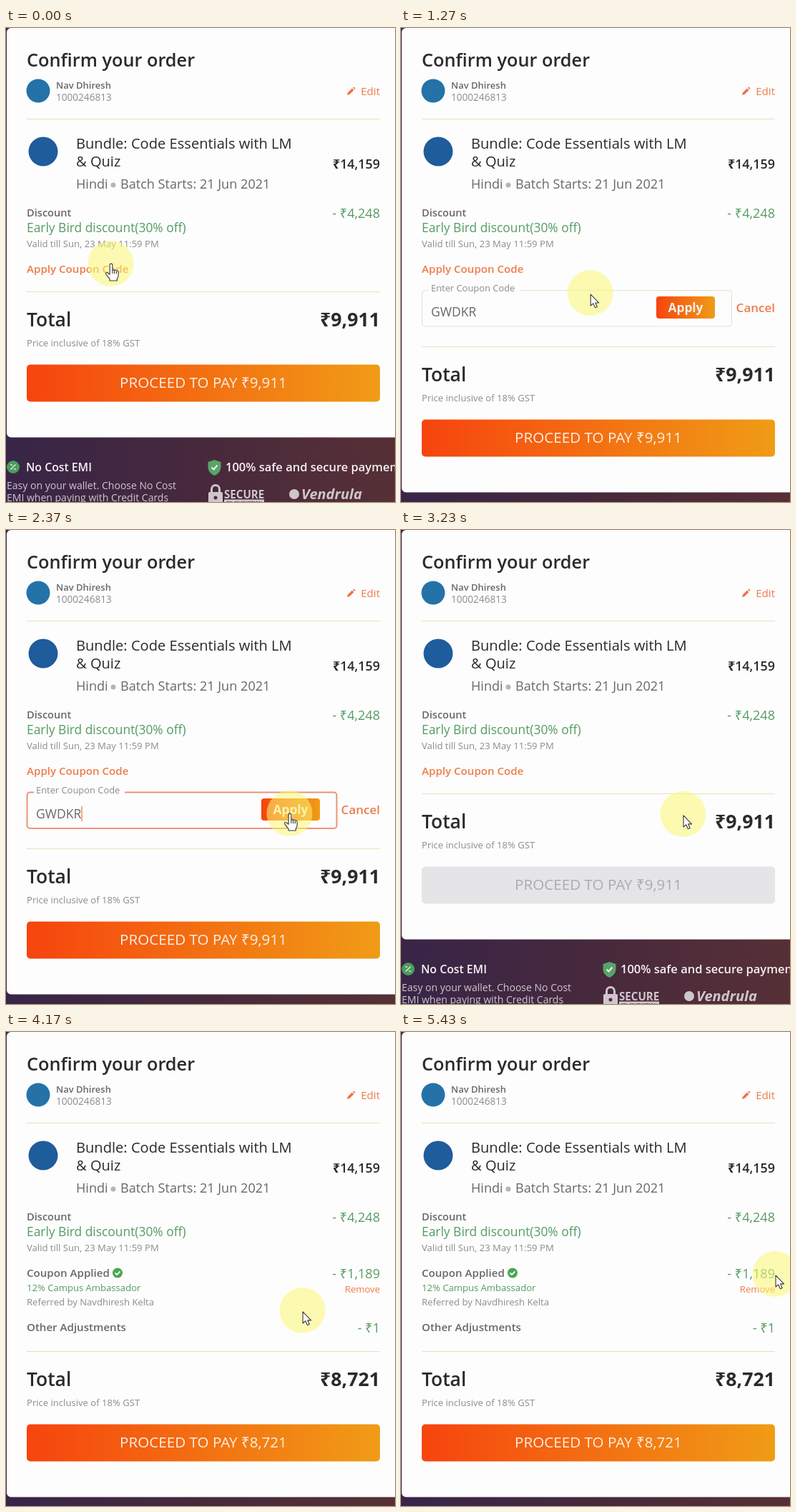
An HTML page that plays this animation: 544x664 px, repeating every 5.46 s.

```html
<!DOCTYPE html>
<html lang="en">
<head>
<meta charset="utf-8">
<title>Order checkout</title>
<style>
  html, body { margin: 0; width: 100%; height: 100%; overflow: hidden; background: #442a3e; }
  svg { display: block; width: 544px; height: 664px; font-family: "Open Sans", "Noto Sans", sans-serif; }
  text { white-space: pre; }
  .semi { font-weight: 600; }
  .bold { font-weight: 700; }
  .end { text-anchor: end; }
  .mid { text-anchor: middle; }
  .ink { fill: #2a2a2e; }
  .soft { fill: #68686a; }
  .pale { fill: #8c8c8c; }
  .green { fill: #559c64; }
  .orange { fill: #ee7c4c; }
  .cream { fill: #f6f0f2; }
  .beige { fill: #cfc6cc; }
  .s13 { font-size: 13.1px; }
  .s15 { font-size: 15.100px; }
  .s18 { font-size: 18.1px; }
  .rule { stroke: #e4e3bc; }
</style>
</head>
<body>
<svg viewBox="0 0 544 664">
  <defs>
    <linearGradient id="fire"><stop stop-color="#f6440e"/><stop offset="1" stop-color="#f09c16"/></linearGradient>
    <linearGradient id="dusk">
      <stop stop-color="#382548"/><stop offset=".5" stop-color="#47293c"/><stop offset="1" stop-color="#573036"/>
    </linearGradient>
  </defs>

  <rect width="544" height="664" fill="url(#dusk)"/>
  <rect id="card" x="1" y="0" width="560" height="573" rx="6" fill="#fdfdfd"/>

  <!-- order details -->
  <text x="29" y="54" font-size="25.300" class="semi ink">Confirm your order</text>
  <circle cx="45" cy="88" r="16.5" fill="#2472a8"/>
  <text x="70" y="85" font-size="13" class="semi soft">Nav Dhiresh</text>
  <text x="70" y="102" font-size="13.6" class="pale">1000246813</text>
  <path d="M477 94l1-3.500 6-6 2.500 2.500-6 6zM485 83.500l1.500-1 2 2-1 1.500z" fill="#f07048"/>
  <text x="523" y="94" class="end orange s15">Edit</text>
  <path d="M29 127.500H523" class="rule"/>
  <circle cx="52" cy="173" r="20.500" fill="#1f5c9c"/>
  <text x="98" y="169" font-size="20.100" class="ink">Bundle: Code Essentials with LM</text>
  <text x="98" y="194" font-size="20.100" class="ink">&amp; Quiz</text>
  <text x="98" y="225" class="soft s18">Hindi</text>
  <circle cx="150" cy="220" r="3.500" fill="#b6b6b0"/>
  <text x="160" y="225" class="soft s18">Batch Starts: 21 Jun 2021</text>
  <text x="523" y="197" font-size="17.900" class="semi end ink">₹14,159</text>
  <text x="29" y="264" font-size="14.600" class="semi soft">Discount</text>
  <text x="29" y="286" font-size="17.400" class="green">Early Bird discount(30% off)</text>
  <text x="29" y="307" class="pale s13">Valid till Sun, 23 May 11:59 PM</text>
  <text x="523" y="266" class="end green s18">- ₹4,248</text>

  <text id="link" x="29" y="343" class="semi orange s15">Apply Coupon Code</text>

  <g id="form">
    <rect id="field" x="29.500" y="367.500" width="433" height="50.500" rx="4" fill="none"/>
    <path d="M39 367.500H166" stroke="#fdfdfd" stroke-width="4"/>
    <text x="42" y="369" font-size="12.900" class="pale">Enter Coupon Code</text>
    <text x="42" y="404" font-size="17.500" class="soft">GWDKR</text>
    <path id="caret" d="M106 387V408" stroke="#ee8c60" stroke-width="1.500"/>
    <rect x="357" y="376" width="82" height="31" rx="4" fill="url(#fire)"/>
    <text x="398" y="398" font-size="17.300" class="bold mid cream">Apply</text>
    <text x="523" y="398" font-size="17" class="semi end orange">Cancel</text>
  </g>

  <g id="applied">
    <text x="29" y="343" class="semi soft s15">Coupon Applied</text>
    <circle cx="156" cy="337.500" r="7" fill="#4ca650"/>
    <path d="M152.500 337.500l2.500 2.500 4.500-4.500" fill="none" stroke="#fff" stroke-width="1.800"/>
    <text x="29" y="363" class="green s13">12% Campus Ambassador</text>
    <text x="29" y="383" class="pale s13">Referred by Navdhiresh Kelta</text>
    <text x="523" y="345" class="end green s18">- ₹1,189</text>
    <text x="523" y="365" class="end orange s13">Remove</text>
    <text x="29" y="419" class="semi soft s15">Other Adjustments</text>
    <text x="523" y="421" class="end green s18">- ₹1</text>
  </g>

  <!-- everything below the coupon area moves with its height -->
  <g id="lower">
    <path d="M29 369.500H523" class="rule"/>
    <text x="29" y="418" font-size="26.400" class="semi ink">Total</text>
    <text id="total" x="523" y="418" font-size="26.700" class="bold end ink"></text>
    <text x="29" y="446" class="pale s13">Price inclusive of 18% GST</text>
    <rect id="pay" x="29" y="471.500" width="494" height="52" rx="5"/>
    <text id="payLabel" x="276" y="504" font-size="20.600" class="mid"></text>

    <circle cx="10" cy="615" r="9" fill="#4c9c5c"/>
    <path d="M6.500 618.500l7-7M6 612h3M11 618h3" stroke="#d4e8d8" stroke-width="1.600"/>
    <text x="28" y="621" font-size="15.800" class="semi cream">No Cost EMI</text>
    <text x="1" y="646" font-size="14" class="beige">Easy on your wallet. Choose No Cost</text>
    <text x="1" y="663" font-size="14" class="beige">EMI when paying with Credit Cards</text>
    <path d="M291.500 605l9 3v7q0 8-9 12q-9-4-9-12v-7z" fill="#58a468"/>
    <path d="M287.500 615.500l3 3 5-6" fill="none" stroke="#eaf4ec" stroke-width="2"/>
    <text x="307" y="621" font-size="16.500" class="semi cream">100% safe and secure payments</text>
    <path d="M287.500 651v-5a5.500 5.500 0 0 1 11 0v5" fill="none" stroke="#cfc6cc" stroke-width="3"/>
    <rect x="283" y="650" width="20" height="16" rx="2" class="beige"/>
    <circle cx="293" cy="658" r="2.500" fill="#4c2c40"/>
    <text x="305" y="659" class="bold beige s15">SECURE</text>
    <rect x="305" y="660.500" width="56" height="7" class="beige"/>
    <text x="333" y="666.500" font-size="6" class="bold mid" fill="#4a2c40">SSL ENCRYPTION</text>
    <circle cx="403" cy="653" r="7" class="beige"/>
    <text x="413" y="660" font-size="20" font-style="italic" class="bold beige">Vendrula</text>
  </g>

  <g id="pointer">
    <circle cx="-.500" cy="-1" r="32" fill="#fbf774" opacity=".55"/>
    <circle id="ring" fill="none" stroke="#f08050" stroke-width="4"/>
    <g transform="scale(.92)" stroke="#38383c" stroke-width="1.200" stroke-linejoin="round" fill="#fdfdfd">
      <path id="arrow" d="M0 1V18.500L4 15 7 21.500 10 20 7.200 14H12.500Z"/>
      <path id="hand" d="M-2 1q0-2 2-2t2 2V9q1-1.500 3 0q2-1 3.200.800q2.800-.500 2.800 2.200v5q0 3-2 5v3H-2v-2.500q-3-3-6-8q0-3 3-1.500l3 2.500zM2 9v5M5 9.500v5M8 10.500v4"/>
      <path id="beam" fill="none" d="M-3-8h2.500l.500 1 .500-1H3M0-7V7M-3 8h2.500l.500-1 .500 1H3"/>
    </g>
  </g>
</svg>
<script>
const LOOP = 5460;
const OPEN = 680, FOCUS = 1640, SUBMIT = 2830, DONE = 3300;
const CLICKS = [590, 1560, 2520];

// time, x, y of the pointer
const PATH = [
  [0, 147, 331], [430, 147, 331], [770, 145, 333], [980, 147, 334], [1270, 265, 372],
  [1500, 306, 393], [1780, 308, 394], [2200, 396, 398], [2370, 397, 398], [3230, 395, 399],
  [3830, 400, 398], [4170, 415, 391], [4600, 458, 370], [5030, 488, 348], [5430, 524, 340], [LOOP, 524, 340]
];

const el = id => document.getElementById(id);
const set = (id, attrs) => Object.entries(attrs).forEach(([k, v]) => el(id).setAttribute(k, v));
const show = (id, on) => { el(id).style.display = on ? "" : "none"; };

function pointerAt(t) {
  const i = Math.max(1, PATH.findIndex(p => p[0] > t));
  const [t0, x0, y0] = PATH[i - 1], [t1, x1, y1] = PATH[i];
  const u = (t - t0) / (t1 - t0);
  return [x0 + (x1 - x0) * u, y0 + (y1 - y0) * u];
}

function render(t) {
  const formOpen = t >= OPEN && t < SUBMIT;
  const busy = t >= SUBMIT && t < DONE;
  const done = t >= DONE;
  const focused = t >= FOCUS;
  const shift = done ? 78 : formOpen ? 77 : 0;
  const amount = done ? "₹8,721" : "₹9,911";

  show("link", !done);
  show("form", formOpen);
  show("applied", done);
  show("caret", focused);
  set("field", { stroke: focused ? "#ea9478" : "#e3e2cc", "stroke-width": focused ? 2 : 1 });
  set("card", { height: 573.5 + shift });
  set("lower", { transform: `translate(0 ${shift})` });
  set("pay", { fill: busy ? "#e5e5e8" : "url(#fire)" });
  set("payLabel", { fill: busy ? "#acacae" : "#fdf0e6" });
  el("total").textContent = amount;
  el("payLabel").textContent = "PROCEED TO PAY " + amount;

  const [x, y] = pointerAt(t);
  const onLink = t < 1200 && x < 173;
  const onApply = formOpen && x > 357;
  const onField = formOpen && !onApply && t > 1300;
  set("pointer", { transform: `translate(${x} ${y})` });
  show("hand", onLink || onApply);
  show("beam", onField);
  show("arrow", !(onLink || onApply || onField));

  const click = CLICKS.find(c => t >= c && t < c + 340);
  show("ring", click !== undefined);
  if (click !== undefined) {
    const p = (t - click) / 340;
    set("ring", { r: 5 + 11 * p, opacity: Math.min(0.85, 2 * (1 - p)) });
  }
}

function tick() {
  render(performance.now() % LOOP);
  requestAnimationFrame(tick);
}
tick();
</script>
</body>
</html>
```
